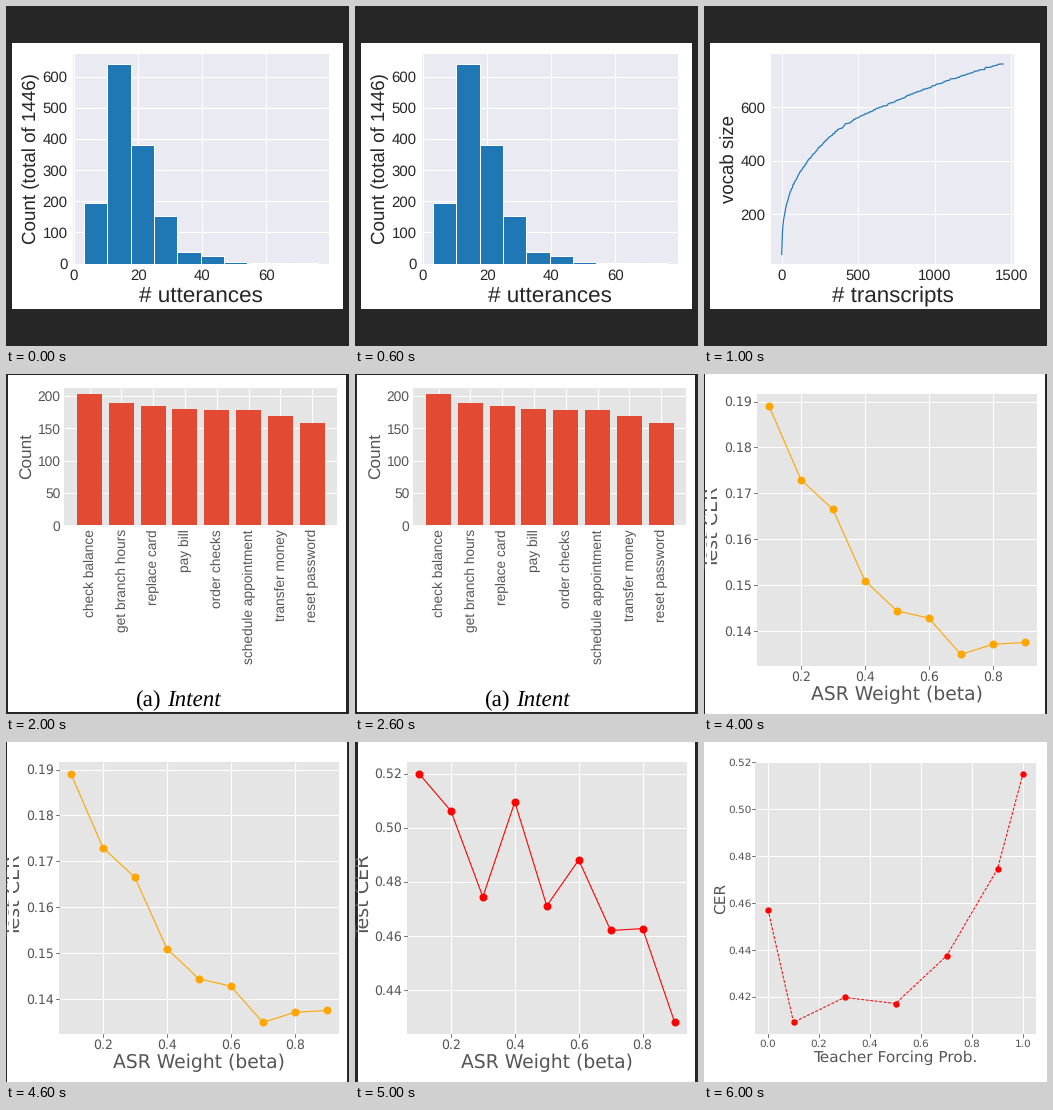
Write a matplotlib script that moves like this. It is 343 px wide and 340 px high and loops after 7 s.

```python
from itertools import count

import matplotlib.pyplot as plt
import numpy as np
from matplotlib.animation import FuncAnimation
from matplotlib.patches import Rectangle

W, H, DPI = 343, 340, 100
PT = 72 / DPI
INK, GREY = "#262626", "#555555"
LAVENDER, PANEL, BLUE, BRICK = "#eaeaf2", "#e5e5e5", "#1f77b4", "#e24a33"
SANS, SERIF, DEJAVU = "Liberation Sans", "Liberation Serif", "DejaVu Sans"

plt.rcParams["text.hinting"] = "none"
fig = plt.figure(figsize=(W / DPI, H / DPI), dpi=DPI)
ax = fig.add_axes([0, 0, 1, 1])
layer = count(1)


# Drawing helpers, all in stage pixels with y pointing down.
def rect(x0, y0, x1, y1, fill, edge="none", width=0):
    ax.add_patch(Rectangle((x0, y0), x1 - x0, y1 - y0, facecolor=fill,
                           edgecolor=edge, linewidth=width * PT,
                           zorder=next(layer)))


def line(xs, ys, color, width=1.0, **kw):
    ax.plot(xs, ys, color=color, linewidth=width * PT, zorder=next(layer), **kw)


def dots(xs, ys, color, size, edge=0, **kw):
    line(xs, ys, color, 0, marker="o", markersize=size * PT,
         markeredgewidth=edge * PT, **kw)


def text(x, y, s, size, color=GREY, font=SANS, ha="center", turn=0, **kw):
    ax.text(x, y, s, fontsize=size * PT, color=color, family=font, ha=ha,
            va="baseline", rotation=turn, rotation_mode="anchor",
            zorder=next(layer), **kw)


def border(left, top, right, bottom, fill="white"):
    rect(0, 0, W, H, INK)
    rect(left, top, right, bottom, fill)


class Chart:
    """Plot panel that maps data values to stage pixels."""

    def __init__(self, box, x_zero, x_unit, y_zero, y_unit):
        self.box = box
        self.x = lambda v: x_zero + x_unit * np.asarray(v)
        self.y = lambda v: y_zero - y_unit * np.asarray(v)

    def grid(self, xs, ys, fill=PANEL, ticks=False):
        x0, y0, x1, y1 = self.box
        rect(*self.box, fill)
        for x in self.x(xs):
            line([x, x], [y0, y1], "white", 1.1, solid_capstyle="butt")
            if ticks:
                line([x, x], [y1, y1 + 3], GREY, 0.8)
        for y in self.y(ys):
            line([x0, x1], [y, y], "white", 1.1, solid_capstyle="butt")
            if ticks:
                line([x0 - 3, x0], [y, y], GREY, 0.8)

    def x_labels(self, xs, base, size, form="d", **kw):
        for v in xs:
            text(self.x(v), base, format(v, form), size, **kw)

    def y_labels(self, ys, right, size, form="d", **kw):
        for v in ys:
            text(right, self.y(v) + 0.36 * size, format(v, form), size,
                 ha="right", **kw)

    def box_plot(self, center, low, q1, mid, q3, high, mid_color):
        low, q1, mid, q3, high = self.y([low, q1, mid, q3, high])
        for end, side in ((high, q3), (low, q1)):
            line([center, center], [end, side], "black", 1.2)
            line([center - 2.5, center + 2.5], [end, end], "black", 1.2)
        rect(center - 5, q3, center + 5, q1, "none", "black", 1.2)
        line([center - 4.5, center + 4.5], [mid, mid], mid_color, 1.2)

    def outliers(self, center, values):
        dots([center] * len(values), self.y(values), "black", 2.6, 0.9,
             markerfacecolor="none")


def utterances():
    border(6, 37, 337, 303)
    chart = Chart((67, 48, 323, 258), 68, 3.205, 257.5, 0.3115)
    xs, ys = range(0, 80, 20), range(0, 700, 100)
    chart.grid(xs, ys, LAVENDER)
    counts = [195, 642, 379, 152, 36, *24 / 4 ** np.arange(5)]
    edges = 78 + 23.35 * np.arange(11)
    for left, right, n in zip(edges, edges[1:], counts):
        rect(left, chart.y(n), right, 257.5, BLUE, "white", 1)
    rect(67, 258, 323, 261, "white")
    chart.x_labels(xs, 274, 15, color=INK)
    chart.y_labels(ys, 61.5, 15, color=INK)
    text(195, 295.4, "# utterances", 22.5, INK)
    text(30, 152.5, "Count (total of 1446)", 18.75, INK, turn=90)


def vocabulary():
    border(6, 37, 336, 303)
    chart = Chart((67, 48, 310, 258), 77.7, 0.1531, 261.5, 0.2675)
    xs, ys = range(0, 2000, 500), range(200, 800, 200)
    chart.grid(xs, ys, LAVENDER)
    # Power-law growth with a slight early bulge and random plateaus.
    n = np.linspace(0.2, 1446, 290)
    size = 81 * n ** 0.308 + 14 * np.exp(-((n - 400) / 200) ** 2)
    size += np.random.default_rng(4).normal(0, 2, n.size)
    line(chart.x(n), chart.y(np.maximum.accumulate(size)), BLUE, 1.2)
    chart.x_labels(xs, 274, 15, color=INK)
    chart.y_labels(ys, 61.5, 15, color=INK)
    text(188.5, 296.4, "# transcripts", 22.4, INK)
    text(30, 153, "vocab size", 18.7, INK, turn=90)


def intents():
    border(2, 1, 340, 338)
    names = ["check balance", "get branch hours", "replace card", "pay bill",
             "order checks", "schedule appointment", "transfer money",
             "reset password"]
    slots = range(len(names))
    totals = np.interp(slots, [0, 1, 3, 5, 7], [203, 190, 180, 178, 159])
    chart = Chart((58, 14, 331, 151), 83.5, 31.8, 151.5, 0.647)
    ys = range(0, 250, 50)
    chart.grid(slots, ys)
    for x, n, name in zip(chart.x(slots), totals, names):
        rect(x - 12.5, chart.y(n), x + 12.5, 151, BRICK)
        text(x + 4.3, 155, name, 13.7, ha="right", turn=90)
    chart.y_labels(ys, 54.5, 13.7)
    text(26, 82, "Count", 17.2, turn=90)
    text(129.5, 332, "(a)", 23, "black", SERIF, ha="left")
    text(161, 332, "Intent", 23, "black", SERIF, ha="left", style="italic")


def sentiment():
    border(2, 1, 340, 338, "black")
    rect(19, 18, 323, 321, "white")
    ys = np.arange(6) / 5
    panels = [("Positive", (0, 0.144, 0.228, 0.561, 0.86), [], "#3a9ad9"),
              ("Neutral", (0.14, 0.366, 0.515, 0.567, 0.778),
               np.linspace(0.997, 1.005, 4), "#6f7f88"),
              ("Negative", (0, 0.025, 0.128, 0.26, 0.612),
               [0.685, *np.linspace(0.615, 0.655, 9)], "#6f7f88")]
    for i, (name, stats, extra, color) in enumerate(panels):
        x = 92.3 + 91.1 * i
        chart = Chart((x - 33.3, 27.4, x + 33.7, 294), x, 1, 282.8, 232.5)
        chart.grid([0], ys)
        chart.y_labels(ys, x - 36.8, 12.3, ".1f")
        chart.box_plot(x, *stats, color)
        chart.outliers(x, extra)
        text(x, 305.5, name, 12.3)
    text(36, 159.2, "Probability", 12.3, turn=90)


def weight_chart(chart, ys, rates, color, cut):
    left, bottom, right = chart.box[0], chart.box[3], chart.box[2]
    xs = np.arange(1, 5) / 5
    chart.grid(xs, ys, ticks=True)
    chart.x_labels(xs, bottom + 14.5, 12.5, ".1f", font=DEJAVU)
    chart.y_labels(ys, left - 4.5, 12.5, ".2f", font=DEJAVU)
    betas = chart.x(np.arange(1, 10) / 10)
    line(betas, chart.y(rates), color, 1.1)
    dots(betas, chart.y(rates), color, 8)
    text((left + right) / 2, 326.2, "ASR Weight (beta)", 18.8, font=DEJAVU)
    text(14, 153.7, "Test CER", 19.2, font=DEJAVU, turn=90)
    rect(3, 90, cut, 215, "white")


def low_error():
    border(1, 0, 341, H)
    chart = Chart((52.5, 20, 333, 292), 32.8, 320, 899.6, 4590)
    rates = [0.1891, 0.173, 0.1665, 0.151, 0.1444,
             0.1428, 0.1349, 0.1371, 0.1375]
    weight_chart(chart, np.arange(14, 20) / 100, rates, "orange", 7)


def high_error():
    border(3, 0, 340, H)
    chart = Chart((51.5, 20, 332, 292), 32, 319.5, 1438.2, 2705)
    rates = [0.52, 0.5062, 0.4744, 0.5095, 0.4711,
             0.4881, 0.462, 0.4627, 0.4282]
    weight_chart(chart, np.arange(44, 54, 2) / 100, rates, "red", 4)


def forcing():
    rect(0, 0, W, H, "white")
    chart = Chart((51, 20, 332, 292), 64, 255, 1239.4, 2345)
    xs, ys = np.arange(6) / 5, np.arange(42, 54, 2) / 100
    chart.grid(xs, ys, ticks=True)
    chart.x_labels(xs, 304.5, 10.5, ".1f", font=DEJAVU)
    chart.y_labels(ys, 47.5, 10.5, ".2f", font=DEJAVU)
    probs = chart.x([0, 0.1, 0.3, 0.5, 0.7, 0.9, 1])
    rates = chart.y([0.457, 0.409, 0.4196, 0.417, 0.4373, 0.4744, 0.515])
    line(probs, rates, "red", 1, linestyle=(0, (3, 1.5)))
    dots(probs, rates, "red", 6.4)
    text(191.5, 319.5, "Teacher Forcing Prob.", 15.4, font=DEJAVU)
    text(21, 156.5, "CER", 15.4, font=DEJAVU, turn=90)


SLIDES = [utterances, vocabulary, intents, sentiment,
          low_error, high_error, forcing]


def draw(i):
    ax.clear()
    ax.set_axis_off()
    SLIDES[i]()
    ax.set_xlim(0, W)
    ax.set_ylim(H, 0)
    return []


anim = FuncAnimation(fig, draw, frames=len(SLIDES), init_func=lambda: [],
                     interval=1000, repeat=True, repeat_delay=0)
plt.show()
```
